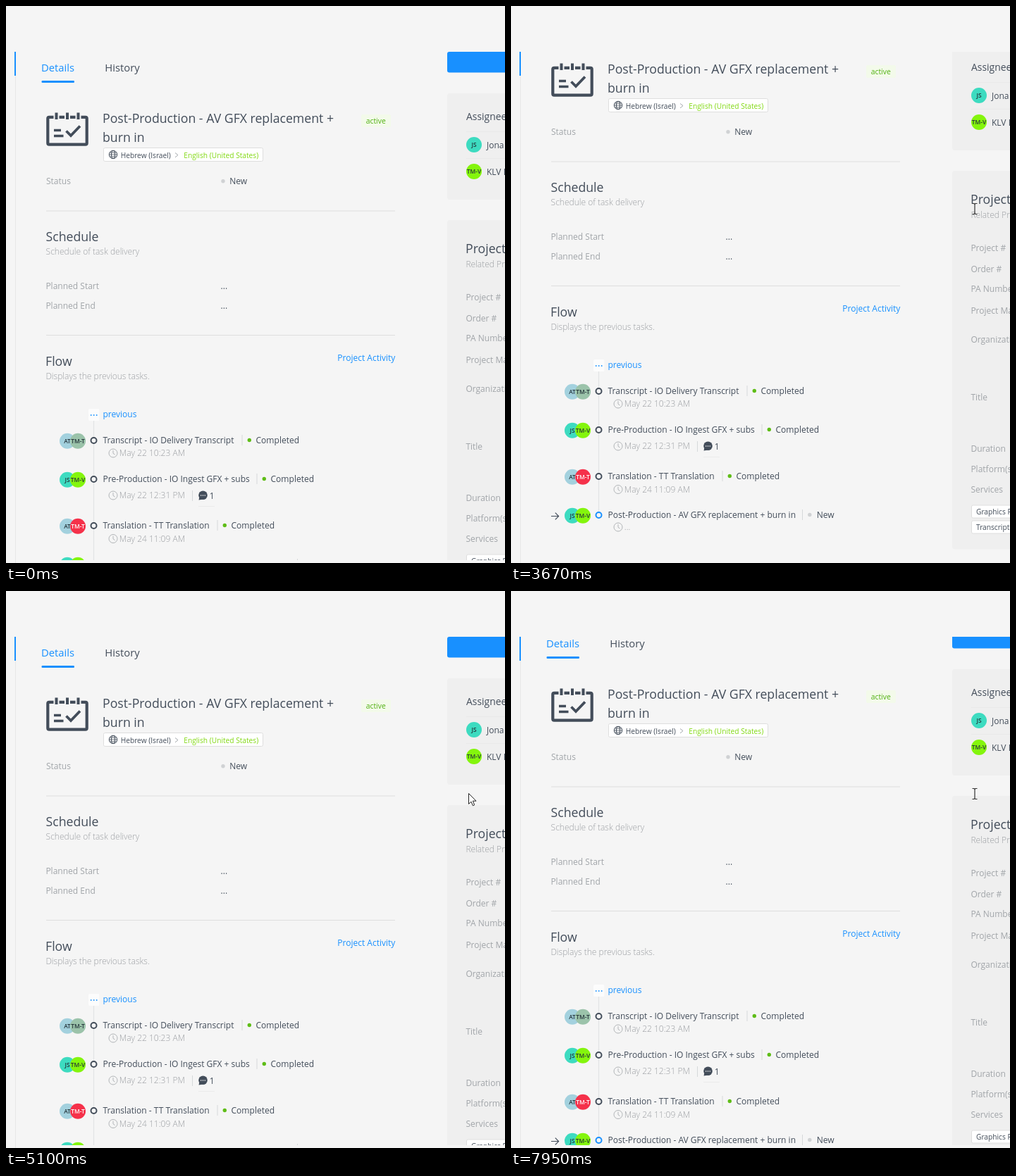
Animation of 708 by 791 pixels, one loop 8000 ms. Source, as an HTML page:

```html
<!DOCTYPE html>
<html lang="en">
<head>
<meta charset="utf-8">
<title>Task details</title>
<style>
  html, body { margin: 0; width: 100%; height: 100%; overflow: hidden; background: #f5f5f5; }
  svg { display: block; width: 708px; height: 791px; }
  text { font-family: "Open Sans", "Noto Sans", sans-serif; font-size: 12.03px; fill: #434d5a; white-space: pre; }
  .muted { fill: #a1a5a9; }
  .light { fill: #9c9fa3; font-weight: 300; }
  .link { fill: #1890ff; }
  .title { font-size: 17.7px; }
  .tab { font-size: 14.8px; }
  .card { font-size: 13.9px; }
  .small { font-size: 10.2px; }
  .green { fill: #80d810; }
  .tag { font-size: 10.4px; fill: #50b010; }
  .badge { font-size: 8.4px; font-weight: 600; text-anchor: middle; fill: #24343a; }
  .white { fill: #fff; }
  .end { text-anchor: end; }
</style>
</head>
<body>
<svg viewBox="0 0 708 791">
  <defs><clipPath id="view"><rect y="65" width="708" height="722"/></clipPath></defs>
  <path d="M13.5 99V791" stroke="#e7e7e7"/>
  <rect x="12" y="65" width="2" height="34" fill="#1890ff"/>
  <g clip-path="url(#view)"><g id="page"></g></g>
  <g id="arrow">
    <path d="M.5 .5V15.5L4 12.2L6.4 17.8L8.7 16.8L6.4 11.2H11Z" fill="#fff" stroke="#222" stroke-linejoin="round"/>
  </g>
  <g id="beam" transform="translate(658 288)">
    <path d="M-3.5 -7.5H-1L0 -6.5L1 -7.5H3.5M0 -6.5V6.5M-3.5 7.5H-1L0 6.5L1 7.5H3.5" fill="none" stroke="#333" stroke-width="1.2"/>
  </g>
</svg>
<script>
const INK = '#434d5a', BLUE = '#1890ff', BG = '#f5f5f5', LINE = '#dedede';
const SKY = '#a3d1de', SAGE = '#9bc3aa', TEAL = '#3ddbc0', LIME = '#84f50d', RED = '#f5314a';
const DONE = '#5fbd18', IDLE = '#d0d2d4';
const $ = id => document.getElementById(id);

const text = (x, y, s, cls = '') => `<text x="${x}" y="${y}" class="${cls}">${s}</text>`;
const rect = (x, y, w, h, fill, r = 0, stroke = 'none') =>
  `<rect x="${x}" y="${y}" width="${w}" height="${h}" rx="${r}" fill="${fill}" stroke="${stroke}"/>`;
const dot = (x, y, r, fill) => `<circle cx="${x}" cy="${y}" r="${r}" fill="${fill}"/>`;
const path = (d, stroke, w = 1, fill = 'none') =>
  `<path d="${d}" fill="${fill}" stroke="${stroke}" stroke-width="${w}"/>`;
const avatar = (x, y, color, s) =>
  dot(x, y, 11, color) + text(x, y + 3, s, 'badge' + (color === RED ? ' white' : ''));
const dots = (x, y, gap, r, fill) => [-1, 0, 1].map(i => dot(x + i * gap, y, r, fill)).join('');
const sep = (x, y) => path(`M${x} ${y - 7.5}v15`, '#d6d8da');

function clock(y) {
  return `<circle cx="152" cy="${y}" r="6" fill="none" stroke="#b2b5b8"/>`
    + path(`M152 ${y - 3.8}v4.1l2.6 1.8`, '#b2b5b8');
}

function calendar() {
  const peg = x => path(`M${x} 153v10`, BG, 8) + path(`M${x} 151.5v9.5`, INK, 4);
  return `<rect x="59.3" y="157.8" width="55.4" height="38.9" rx="2" fill="none" stroke="${INK}" stroke-width="4.2"/>`
    + [71.5, 87, 102.5].map(peg).join('')
    + path('M68 176.5h10M68 184.5h13.5', INK, 3.4)
    + path('M85.5 177.5l6.5 6.5l13 -13.5', INK, 3.8);
}

function globe(x, y) {
  return `<g fill="none" stroke="${INK}"><circle cx="${x}" cy="${y}" r="5.7"/>`
    + `<ellipse cx="${x}" cy="${y}" rx="2.6" ry="5.7"/>`
    + `<path d="M${x - 5.7} ${y}h11.4M${x - 4.8} ${y - 2.9}h9.6M${x - 4.8} ${y + 2.9}h9.6" stroke-width=".8"/></g>`;
}

function task({ y, name, at, date, dateY, state = 'Completed', people }) {
  const fresh = state === 'New';
  return avatar(87, y + 1.3, people[0], people[1]) + avatar(102, y + 1.3, people[2], people[3])
    + `<circle cx="124.5" cy="${y + .5}" r="4" fill="${BG}" stroke="${fresh ? BLUE : INK}" stroke-width="2"/>`
    + text(137.5, y + 4, name) + sep(at, y)
    + dot(at + 10.3, y, 2.7, fresh ? IDLE : DONE) + text(at + (fresh ? 20.3 : 19.5), y + 4, state)
    + clock(dateY) + text(160.8, dateY + 4, date, 'light');
}

const tasks = [
  { y: 616.5, name: 'Transcript - IO Delivery Transcript', at: 335, date: 'May 22 10:23 AM', dateY: 635, people: [SKY, 'AT', SAGE, 'TM-T'] },
  { y: 671.5, name: 'Pre-Production - IO Ingest GFX + subs', at: 356, date: 'May 22 12:31 PM', dateY: 695, people: [TEAL, 'JS', LIME, 'TM-V'] },
  { y: 737.5, name: 'Translation - TT Translation', at: 300, date: 'May 24 11:09 AM', dateY: 756.5, people: [SKY, 'AT', RED, 'TM-T'] },
  { y: 792.5, name: 'Post-Production - AV GFX replacement + burn in', at: 413.5, date: '...', dateY: 810, state: 'New', people: [TEAL, 'JS', LIME, 'TM-V'] }
];

const fields = [
  [418, 'Project #'], [447.5, 'Order #'], [476, 'PA Number'], [507, 'Project Manager'],
  [547.5, 'Organization'], [630, 'Title'], [703, 'Duration'], [732, 'Platform(s)'], [761, 'Services']
];
const chip = (y, s) => rect(653.5, y + .5, 90, 18, '#fff', 2, LINE) + text(660, y + 13, s, 'small');

$('page').innerHTML = [
  text(50, 92.5, 'Details', 'tab link'), text(140.3, 92.5, 'History', 'tab'),
  rect(50.5, 106, 46.5, 3, BLUE, 1.2),

  calendar(),
  text(137, 166, 'Post-Production - AV GFX replacement +', 'title'),
  text(137, 192.5, 'burn in', 'title'),
  rect(504, 154, 42, 18, '#f3faea', 2), text(510.7, 167, 'active', 'tag'),
  rect(138.5, 201.5, 226, 19, '#fff', 2, LINE), globe(152, 211),
  text(162.7, 215.5, 'Hebrew (Israel)', 'small'),
  path('M240 208.5l4 3.2l-4 3.2', '#a5a9ad'),
  text(252.3, 215.5, 'English (United States)', 'small green'),
  text(57, 253, 'Status', 'muted'), dot(308, 248.8, 2.7, IDLE), text(317.3, 253, 'New'),
  path('M57 291H552M57 467.5H552', LINE),

  text(56.5, 333.5, 'Schedule', 'title'), text(56.6, 353, 'Schedule of task delivery', 'light'),
  text(56.4, 401.5, 'Planned Start', 'muted'), text(304.5, 401.5, '...'),
  text(56.4, 430, 'Planned End', 'muted'), text(304.5, 430, '...'),

  text(56, 510.5, 'Flow', 'title'), text(56.4, 530, 'Displays the previous tasks.', 'light'),
  text(552.3, 504, 'Project Activity', 'link end'),
  path('M124.5 588V790', '#e2e3e4', 1.2),
  rect(117, 572, 15.5, 17, '#fcfcfc', 2), dots(124.7, 581, 4, .9, BLUE),
  text(137.5, 584, 'previous', 'link'),
  ...tasks.map(task),
  sep(264.5, 695.5), dot(279.5, 694.8, 6.3, INK), path('M274.5 697l-1 4.5l5 -.8z', 'none', 0, INK),
  dots(279.5, 695, 2.8, .8, '#fff'), text(288.7, 699.5, '1'), path('M273 710.5h23', '#ebebeb'),
  path('M57 794.5h10.5M62.8 789.7l4.8 4.8l-4.8 4.8', INK, 1.2),

  rect(626, 65, 100, 29.5, BLUE, 3),
  rect(626, 124, 100, 151, '#efefef', 4), text(653, 162, 'Assignees', 'card'),
  path('M653 178.5H708M653 216.5H708', '#e9e9e9'),
  avatar(664, 197, TEAL, 'JS'), text(682, 201.5, 'Jona Selmer'),
  avatar(664, 235, LIME, 'TM-V'), text(682, 239.5, 'KLV Lab'),
  rect(626, 304, 100, 537.5, '#efefef', 4), text(652, 350.5, 'Project', 'title'),
  text(652.4, 370.5, 'Related Project', 'light'),
  ...fields.map(([y, s]) => text(652.4, y, s, 'muted')),
  chip(778.5, 'Graphics File'), chip(800.5, 'Transcript File')
].join('');

// Scroll runs: start time, step length, offsets
const runs = [
  [1590, 80, [14, 39, 59, 71, 79, 83, 84]],
  [3670, 68, [70, 45, 25, 13, 4, 0, 9, 36, 62, 78, 84]],
  [4630, 90, [70, 42, 20, 7, 1, 0]],
  [5630, 70, [14, 39, 59, 72, 80, 84, 86]],
  [6270, 80, [86, 85, 85, 84, 84, 84]],
  [7740, 70, [70, 45, 25, 13]]
];
const scroll = [[0, 0]];
for (const [start, gap, list] of runs) list.forEach((v, i) => scroll.push([start + i * gap, v]));

const pointer = [
  [0, null], [850, [701, 347]], [920, [684, 323]], [990, [669, 303]], [1060, [659, 291]], [1130, [656, 287]]
];
const shape = [
  [0, 'arrow'], [2060, 'beam'], [4010, 'arrow'], [4350, 'beam'], [5000, 'arrow'], [6040, 'beam']
];

function valueAt(steps, t) {
  let v = steps[0][1];
  for (const [at, next] of steps) if (t >= at) v = next;
  return v;
}

function draw(t) {
  const at = valueAt(pointer, t), kind = valueAt(shape, t);
  $('page').setAttribute('transform', `translate(0 ${-valueAt(scroll, t)})`);
  $('arrow').style.display = at && kind === 'arrow' ? '' : 'none';
  $('beam').style.display = at && kind === 'beam' ? '' : 'none';
  if (at) $('arrow').setAttribute('transform', `translate(${at})`);
}

const begin = performance.now();
function tick() {
  draw((performance.now() - begin) % 8000);
  requestAnimationFrame(tick);
}
tick();
</script>
</body>
</html>
```
